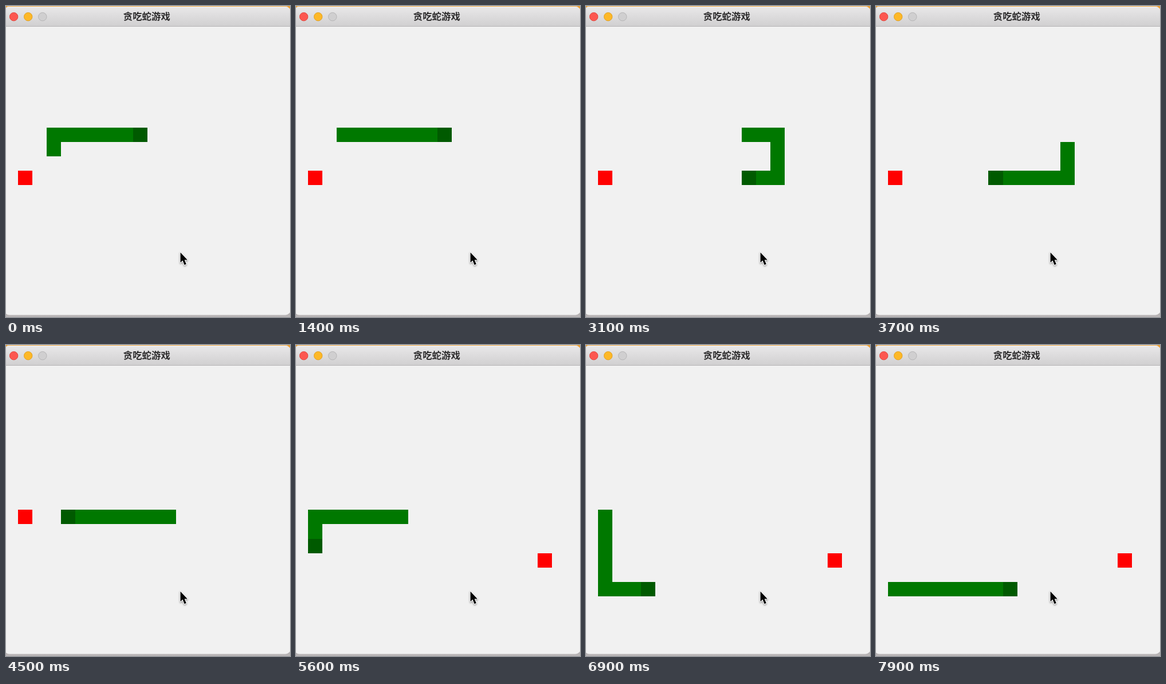
Animation, 496 px wide and 542 px high, one loop 8 s. Source, as an HTML page with a canvas:

```html
<!DOCTYPE html>
<html lang="zh">
<head>
<meta charset="utf-8">
<title>贪吃蛇游戏</title>
<style>
  html, body { margin: 0; width: 100%; height: 100%; overflow: hidden; }
  canvas { display: block; width: 496px; height: 542px; }
</style>
</head>
<body>
<canvas id="stage" width="496" height="542"></canvas>
<script>
const W = 496, H = 542, LOOP = 8000;
const ctx = document.getElementById('stage').getContext('2d');

// Step times: runs of 200 ms ticks as [first, count]
const steps = [[1400, 7], [2900, 11], [5200, 8], [6900, 6]]
  .flatMap(([t, n]) => Array.from({ length: n }, (_, i) => t + i * 200));
const EAT_TIME = 5200, START_LENGTH = 8;

// Every cell the head visits, as [column, row], starting at the first tail
const DIRS = { R: [1, 0], L: [-1, 0], U: [0, -1], D: [0, 1] };
const path = [[2, 1]];
for (const [dir, n] of [['U', 1], ['R', 10], ['D', 3], ['L', 12], ['D', 5], ['R', 8]]) {
  for (let i = 0; i < n; i++) {
    const [x, y] = path[path.length - 1];
    path.push([x + DIRS[dir][0], y + DIRS[dir][1]]);
  }
}

const edgeX = c => Math.round(21.05 + 25.06 * c);
const edgeY = r => Math.round(212 + 25.1 * r);

function cell([c, r], color) {
  const x = edgeX(c), y = edgeY(r);
  ctx.fillStyle = color;
  ctx.fillRect(x, y, edgeX(c + 1) - x, edgeY(r + 1) - y);
}

function vertical(y0, y1, from, to) {
  const g = ctx.createLinearGradient(0, y0, 0, y1);
  g.addColorStop(0, from);
  g.addColorStop(1, to);
  return g;
}

function light(x, fill, rim) {
  ctx.beginPath();
  ctx.arc(x, 18.7, 7.2, 0, Math.PI * 2);
  ctx.fillStyle = fill;
  ctx.fill();
  ctx.lineWidth = 1;
  ctx.strokeStyle = rim;
  ctx.stroke();
}

function drawWindow() {
  ctx.fillStyle = '#e9a03a';
  ctx.fillRect(0, 0, W, 40);
  ctx.fillStyle = vertical(524, H, '#a29fa0', '#bbb7b8');
  ctx.fillRect(0, 524, W, H - 524);

  ctx.save();
  ctx.beginPath();
  ctx.roundRect(-3, 1, 500, 537.5, 9);
  ctx.clip();
  ctx.fillStyle = '#f1f1f1';
  ctx.fillRect(0, 0, W, H);
  ctx.fillStyle = vertical(1, 36, '#e9e8e9', '#d0cfd0');
  ctx.fillRect(0, 1, W, 35);
  ctx.fillStyle = '#f5f4f5';
  ctx.fillRect(0, 1, W, 1);
  ctx.fillStyle = '#b4b3b4';
  ctx.fillRect(0, 35, W, 1);
  ctx.restore();

  light(13.6, '#fc5750', '#e2463f');
  light(38.7, '#fdb827', '#e0a023');
  light(63.8, '#d0cfd0', '#b6b5b6');

  ctx.fillStyle = '#2b2a2b';
  ctx.font = 'bold 16.4px "Noto Sans CJK SC", "Noto Sans CJK", sans-serif';
  ctx.textAlign = 'center';
  ctx.textBaseline = 'alphabetic';
  ctx.fillText('贪吃蛇游戏', 245.8, 24.4);
}

function drawPointer() {
  ctx.save();
  ctx.translate(304.6, 429.6);
  ctx.beginPath();
  ctx.moveTo(0, 0);
  for (const [x, y] of [[0, 17.6], [3.9, 14], [7, 21.6], [10.2, 20.2], [7.1, 12.8], [12.3, 12.8]]) {
    ctx.lineTo(x, y);
  }
  ctx.closePath();
  ctx.lineJoin = 'round';
  ctx.lineWidth = 2.2;
  ctx.strokeStyle = '#fff';
  ctx.shadowColor = 'rgba(0,0,0,.4)';
  ctx.shadowBlur = 3;
  ctx.shadowOffsetY = 1.5;
  ctx.stroke();
  ctx.shadowColor = 'transparent';
  ctx.fillStyle = '#000';
  ctx.fill();
  ctx.restore();
}

function draw(t) {
  drawWindow();
  const eaten = t >= EAT_TIME;
  const head = START_LENGTH - 1 + steps.filter(s => s <= t).length;
  const length = START_LENGTH + (eaten ? 1 : 0);

  cell(eaten ? [16, 6] : [0, 3], '#ff0000');
  path.slice(head - length + 1, head).forEach(p => cell(p, '#007800'));
  cell(path[head], '#005a00');
  drawPointer();
}

const start = performance.now();
function frame() {
  draw((performance.now() - start) % LOOP);
  requestAnimationFrame(frame);
}
frame();
</script>
</body>
</html>
```
